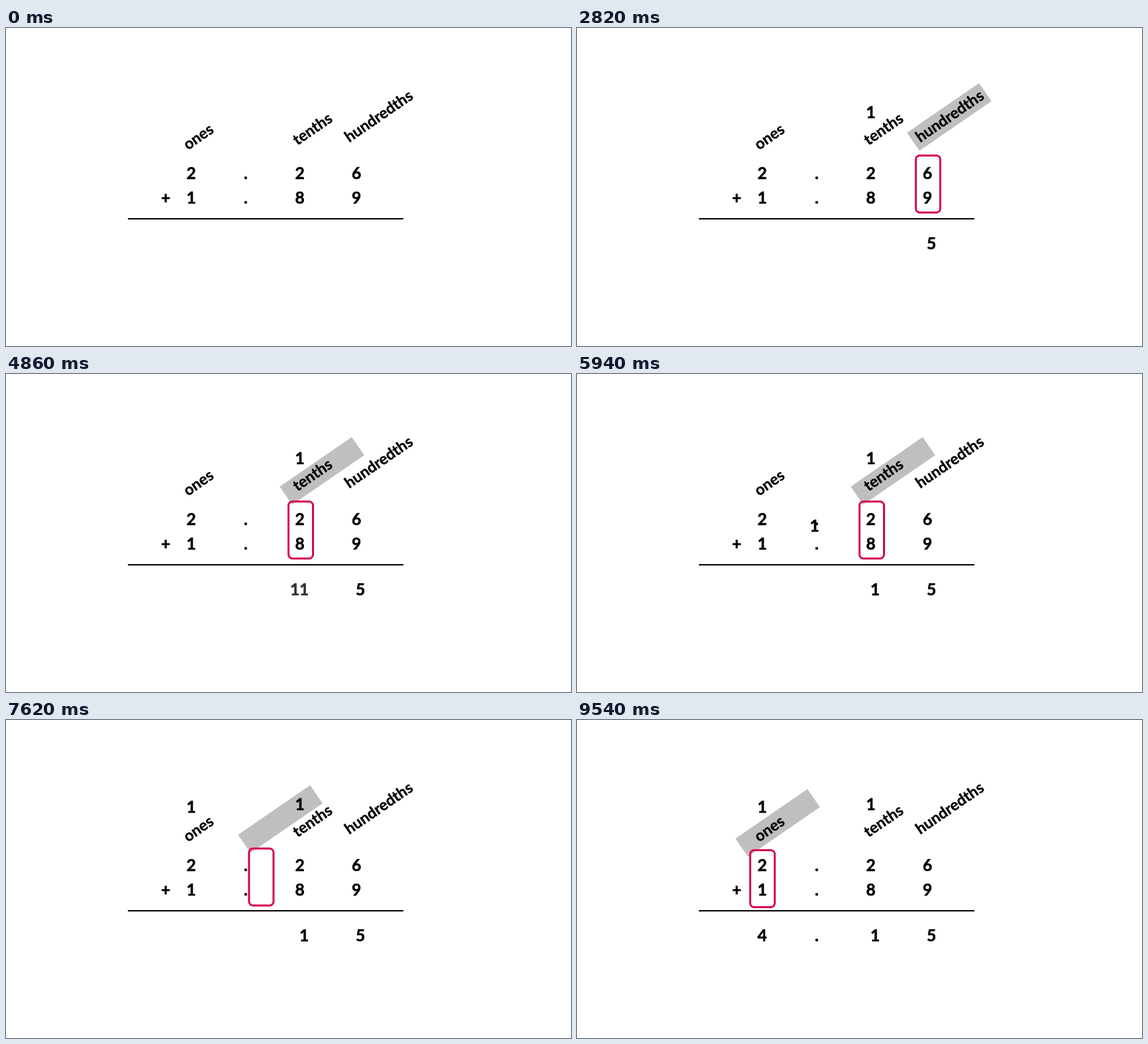
Recreate the animation shown at these times as an HTML page. Size 853 by 480 pixels, loop 9600 ms.

```html
<!DOCTYPE html>
<html lang="en">
<head>
<meta charset="utf-8">
<title>Adding decimals</title>
<style>
  html, body { margin: 0; width: 100%; height: 100%; overflow: hidden; background: #fff; }
  svg { display: block; width: 853px; height: 480px; }
  text { font: 700 24.5px Lato, sans-serif; text-anchor: middle; stroke: #000; stroke-width: .6px; }
  .label { font-size: 23.3px; stroke-width: .35px; }
</style>
</head>
<body>
<svg id="stage" viewBox="0 0 853 480">
  <rect id="band" x="-66" y="-16.6" width="132" height="33.2" fill="#bfbfbf"/>
  <path d="M184 288H600" stroke="#000" stroke-width="2"/>
  <g id="digits"></g>
  <rect id="frame" x="511.5" y="192.5" width="37" height="86" rx="6" fill="none" stroke="#d60057" stroke-width="3"/>
</svg>
<script>
const LOOP = 9600, STEP = 60, TILT = -34.5;
const $ = id => document.getElementById(id);

function addText(str, x, y, tilt) {
  const el = document.createElementNS('http://www.w3.org/2000/svg', 'text');
  el.textContent = str;
  el.setAttribute('transform', `translate(${x} ${y}) rotate(${tilt || 0})`);
  if (tilt) el.setAttribute('class', 'label');
  $('digits').append(el);
  return el;
}

const COLS = [279.7, 361.8, 443.5, 529];
['2.26', '1.89'].forEach((row, r) =>
  [...row].forEach((ch, c) => addText(ch, COLS[c], 228 + 37 * r)));
addText('+', 241, 265);
addText('ones', 295, 170.7, TILT);
addText('tenths', 467.2, 159, TILT);
addText('hundredths', 567.2, 139.6, TILT);

// Result digits: text, x, fade start
const results = [['5', 535, 400], ['1', 450, 4460], ['4', 279.7, 8540], ['.', 361.8, 9040]]
  .map(([ch, x, at]) => ({ el: addText(ch, x, 334), at }));

// Carried ones: fade start, move start, from, to
const carries = [
  { at: 400, go: 940, from: [521, 334], to: [443.5, 136] },
  { at: 4460, go: 5020, from: [436, 334], to: [279.7, 140] }
].map(c => ({ ...c, el: addText('1', ...c.from) }));

const clamp = v => Math.min(1, Math.max(0, v));
const ease = p => p < .5 ? 2 * p * p : 1 - 2 * (1 - p) ** 2;
const glide = (t, start, len) => ease(clamp((t - start) / len));
const fade = (el, t, start, len) => el.setAttribute('opacity', clamp((t - start) / len));
const place = (el, x, y, tilt) => el.setAttribute('transform', `translate(${x} ${y}) rotate(${tilt || 0})`);

function draw(t) {
  const a = glide(t, 2860, 1600), b = glide(t, 6940, 1600);
  place($('band'), 562 - 85 * a - 174 * b, 134.3 + 12 * a + 9 * b, TILT);
  place($('frame'), -85 * a - 165 * b, 4 * b);
  fade($('band'), t, 0, 400);
  fade($('frame'), t, 0, 400);
  for (const { el, at } of results) fade(el, t, at, 500);
  for (const { el, at, go, from, to } of carries) {
    const p = glide(t, go, 1850);
    fade(el, t, at, 500);
    place(el, from[0] + (to[0] - from[0]) * p, from[1] + (to[1] - from[1]) * p);
  }
}

const origin = performance.now();
function tick() {
  const t = (performance.now() - origin) % LOOP;
  draw(Math.floor(t / STEP) * STEP);
  requestAnimationFrame(tick);
}
tick();
</script>
</body>
</html>
```
